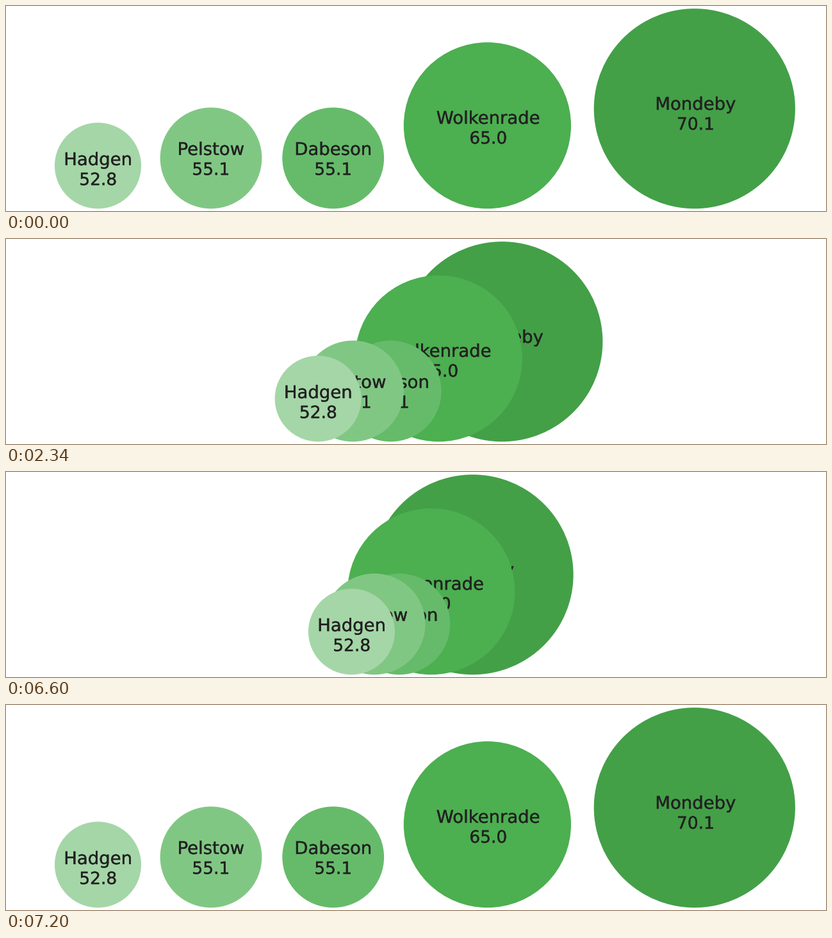
Animation, 1280 px wide and 322 px high, one loop 9000 ms. Source, as a matplotlib script:

```python
import matplotlib.pyplot as plt
import numpy as np
from matplotlib.animation import FuncAnimation
from matplotlib.patches import Circle
from matplotlib.patheffects import withStroke

W, H, DPI = 1280, 322, 100
FRAMES, STEP_MS = 300, 30
GATHER, SPREAD, MOVE = 60, 210, 30  # in frames
FLOOR = 318.3
INK = "#212121"
LINE = 31.2

# name, value, radius, spread x, gathered x, text dx, name baseline, fill
BUBBLES = [
    ("Hadgen", "52.8", 67.5, 143.5, 640.7, 0.3, 250, "#a5d6a7"),
    ("Pelstow", "55.1", 79.4, 320.0, 640.3, 0.0, 234, "#81c784"),
    ("Dabeson", "55.1", 79.4, 510.7, 640.3, 0.2, 234, "#66bb6a"),
    ("Wolkenrade", "65.0", 130.6, 751.4, 641.4, 1.5, 185, "#4caf50"),
    ("Mondeby", "70.1", 157.1, 1074.8, 640.0, 1.6, 163, "#43a047"),
]

# cubic bezier easing (.5, 0, .5, 1), sampled along its parameter
S = np.linspace(0, 1, 1001)
EASE_X = 1.5 * S * (1 - S) + S**3
EASE_Y = 3 * S**2 - 2 * S**3


def ease(p):
    return np.interp(p, EASE_X, EASE_Y)


def gathered(i):
    """Share of the way from the spread row (0) to the stack (1)."""
    return ease((i - GATHER) / MOVE) - ease((i - SPREAD) / MOVE)


fig = plt.figure(figsize=(W / DPI, H / DPI), dpi=DPI, facecolor="white")
ax = fig.add_axes([0, 0, 1, 1])
ax.set_xlim(0, W)
ax.set_ylim(H, 0)
ax.set_axis_off()

# a hairline outline gives the letters a medium weight
MEDIUM = [withStroke(linewidth=0.25, foreground=INK)]


def label(text, x, y, px, z):
    return ax.text(x, y, text, size=px * 72 / DPI, family="DejaVu Sans",
                   color=INK, ha="center", va="baseline", zorder=z,
                   path_effects=MEDIUM)


parts = []
for k, (name, value, r, x, _, dx, base, fill) in enumerate(BUBBLES):
    z = 2 * (len(BUBBLES) - k)
    disc = Circle((x, FLOOR - r), r, facecolor=fill, edgecolor="none", zorder=z)
    ax.add_patch(disc)
    texts = (label(name, x + dx, base, 27.5, z + 1),
             label(value, x + dx, base + LINE, 26.5, z + 1))
    parts.append((disc, texts))


def draw(i):
    g = gathered(i)
    for (disc, texts), (_, _, r, x0, x1, dx, _, _) in zip(parts, BUBBLES):
        x = x0 + (x1 - x0) * g
        disc.set_center((x, FLOOR - r))
        for t in texts:
            t.set_x(x + dx)
    return []


anim = FuncAnimation(fig, draw, frames=FRAMES, interval=STEP_MS,
                     init_func=lambda: draw(0), repeat=True, repeat_delay=0)
plt.show()
```
